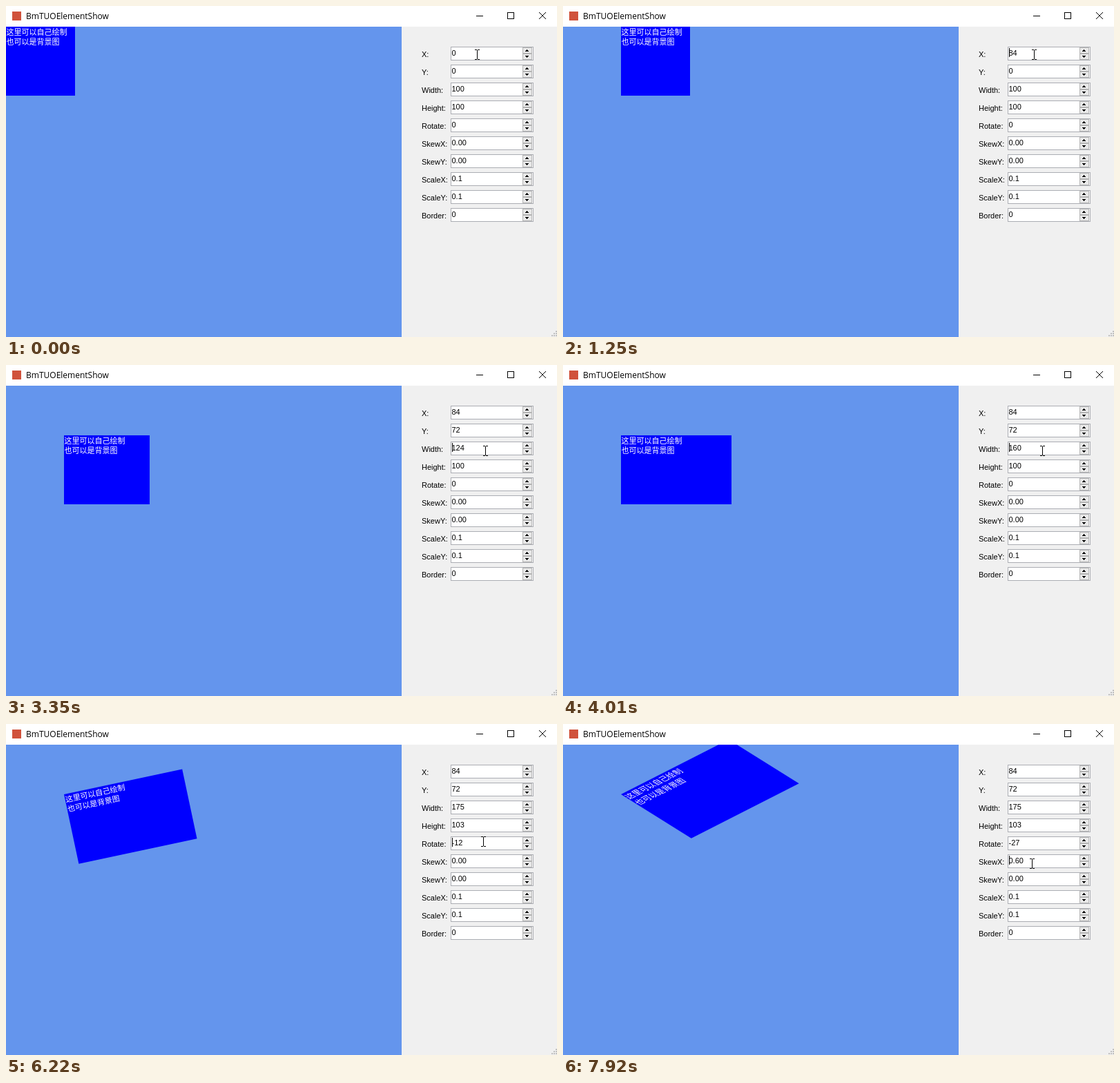
Recreate the animation shown at these times as an HTML page with a canvas. Size 798 by 480 pixels, loop 8 s.

```html
<!DOCTYPE html>
<html lang="zh-CN">
<head>
<meta charset="utf-8">
<title>BmTUOElementShow</title>
<style>
html, body { margin: 0; width: 100%; height: 100%; overflow: hidden; background: #f0f0f0; }
canvas { display: block; width: 798px; height: 480px; }
</style>
</head>
<body>
<canvas id="stage" width="798" height="480"></canvas>
<script>
const ctx = document.getElementById('stage').getContext('2d');
const LOOP = 8000;
const UI_FONT = '11px "Liberation Sans", Arial, sans-serif';
const CJK_FONT = '11px "Noto Sans CJK SC", "Noto Sans CJK", sans-serif';
const LABELS = ['X', 'Y', 'Width', 'Height', 'Rotate', 'SkewX', 'SkewY', 'ScaleX', 'ScaleY', 'Border'];

const START = { x: 0, y: 0, w: 100, h: 100, rot: 0, skew: 0, mouse: [682, 70], row: -1, end: false };

// Each step changes part of the state and holds until the next one.
const STEPS = [
  [310, { x: 18, row: 0 }],
  [580, { x: 39 }],
  [860, { x: 60 }],
  [1110, { x: 78 }],
  [1250, { x: 84 }],
  [1390, { mouse: [686, 97], row: 1, end: true }],
  [1660, { y: 15, end: false }],
  [1930, { y: 33 }],
  [2160, { y: 48 }],
  [2430, { y: 66 }],
  [2580, { y: 72 }],
  [2710, { mouse: [691, 112] }],
  [2850, { mouse: [694, 124], row: 2, end: true }],
  [3100, { w: 106, end: false }],
  [3220, { w: 115 }],
  [3350, { w: 124 }],
  [3500, { w: 133 }],
  [3640, { w: 142 }],
  [3770, { w: 151 }],
  [3910, { w: 160 }],
  [4050, { w: 169 }],
  [4180, { w: 175 }],
  [4320, { mouse: [704, 126] }],
  [4590, { mouse: [704, 148], row: -1 }],
  [4710, { mouse: [703, 168] }],
  [4990, { mouse: [694, 152] }],
  [5110, { row: 3, end: true }],
  [5360, { h: 102, end: false }],
  [5500, { h: 103 }],
  [5640, { mouse: [693, 160] }],
  [5780, { mouse: [691, 170] }],
  [5960, { row: 4, end: true }],
  [6100, { rot: -5, end: false }],
  [6220, { rot: -12 }],
  [6340, { rot: -18 }],
  [6470, { rot: -24 }],
  [6600, { rot: -27 }],
  [6770, { mouse: [685, 187] }],
  [6930, { mouse: [679, 202], row: -1 }],
  [7220, { row: 5, end: true }],
  [7370, { skew: 0.11, end: false }],
  [7510, { skew: 0.23 }],
  [7650, { skew: 0.36 }],
  [7780, { skew: 0.48 }],
  [7920, { skew: 0.6 }]
];

function stateAt(t) {
  const s = { ...START };
  for (const [at, change] of STEPS) if (at <= t) Object.assign(s, change);
  return s;
}

function box(color, x, y, w, h) {
  ctx.fillStyle = color;
  ctx.fillRect(x, y, w, h);
}

function frame(color, x, y, w, h) {
  ctx.strokeStyle = color;
  ctx.lineWidth = 1;
  ctx.strokeRect(x + 0.5, y + 0.5, w - 1, h - 1);
}

function text(str, x, y, font, color) {
  ctx.font = font;
  ctx.fillStyle = color;
  ctx.fillText(str, x, y);
}

function drawTitleBar() {
  box('#fff', 0, 0, 798, 30);
  box('#d0523c', 9, 8, 13, 13);
  text('BmTUOElementShow', 29, 19, '12px "Open Sans", "Noto Sans", sans-serif', '#000');
  box('#000', 681, 14, 10, 1);
  frame('#000', 726, 9, 10, 10);
  ctx.beginPath();
  ctx.moveTo(772, 9);
  ctx.lineTo(782, 19);
  ctx.moveTo(782, 9);
  ctx.lineTo(772, 19);
  ctx.stroke();
}

function drawPanel(s) {
  ctx.save();
  ctx.beginPath();
  ctx.rect(0, 30, 573, 450);
  ctx.clip();
  box('#6495ed', 0, 30, 573, 450);
  ctx.translate(s.x, 30 + s.y);
  ctx.rotate(s.rot * Math.PI / 180);
  ctx.transform(1, 0, s.skew, 1, 0, 0);
  box('#00f', 0, 0, s.w, s.h);
  text('这里可以自己绘制', 0.5, 12, CJK_FONT, '#fff');
  text('也可以是背景图', 0.5, 26, CJK_FONT, '#fff');
  ctx.restore();
}

function drawArrow(y, dir) {
  for (let i = 0; i < 3; i++) box('#000', 754 - i, y + dir * i, 1 + 2 * i, 1);
}

function drawField(label, value, i, s) {
  const y = 59 + 26 * i;
  text(label + ':', 602, y + 15, UI_FONT, '#000');
  box('#fff', 644, y, 120, 20);
  frame('#abadb3', 644, y, 120, 20);
  for (const top of [y + 1, y + 10]) {
    box('#e9e9e9', 748, top, 14, 9);
    frame('#b4b4b4', 748, top, 14, 9);
  }
  drawArrow(y + 4, 1);
  drawArrow(y + 15, -1);
  text(value, 645.5, y + 13, UI_FONT, '#000');
  if (s.row === i) {
    const dx = s.end ? Math.round(ctx.measureText(value).width) : 0;
    box('#000', 646 + dx, y + 2, 1, 13);
  }
}

function drawGrip() {
  for (let r = 0; r < 3; r++)
    for (let c = 0; c <= r; c++) box('#bfbfbf', 796 - 3 * c, 471 + 3 * r, 2, 2);
}

function drawMouse([x, y]) {
  box('#000', x, y - 6, 1, 13);
  for (const cy of [y - 7, y + 7]) {
    box('#000', x - 3, cy, 3, 1);
    box('#000', x + 1, cy, 3, 1);
  }
}

function draw(t) {
  const s = stateAt(t);
  const values = [s.x, s.y, s.w, s.h, s.rot, s.skew.toFixed(2), '0.00', '0.1', '0.1', 0];
  box('#f0f0f0', 0, 0, 798, 480);
  drawTitleBar();
  drawPanel(s);
  LABELS.forEach((label, i) => drawField(label, String(values[i]), i, s));
  drawGrip();
  drawMouse(s.mouse);
}

function tick() {
  draw(performance.now() % LOOP);
  requestAnimationFrame(tick);
}
tick();
</script>
</body>
</html>
```
